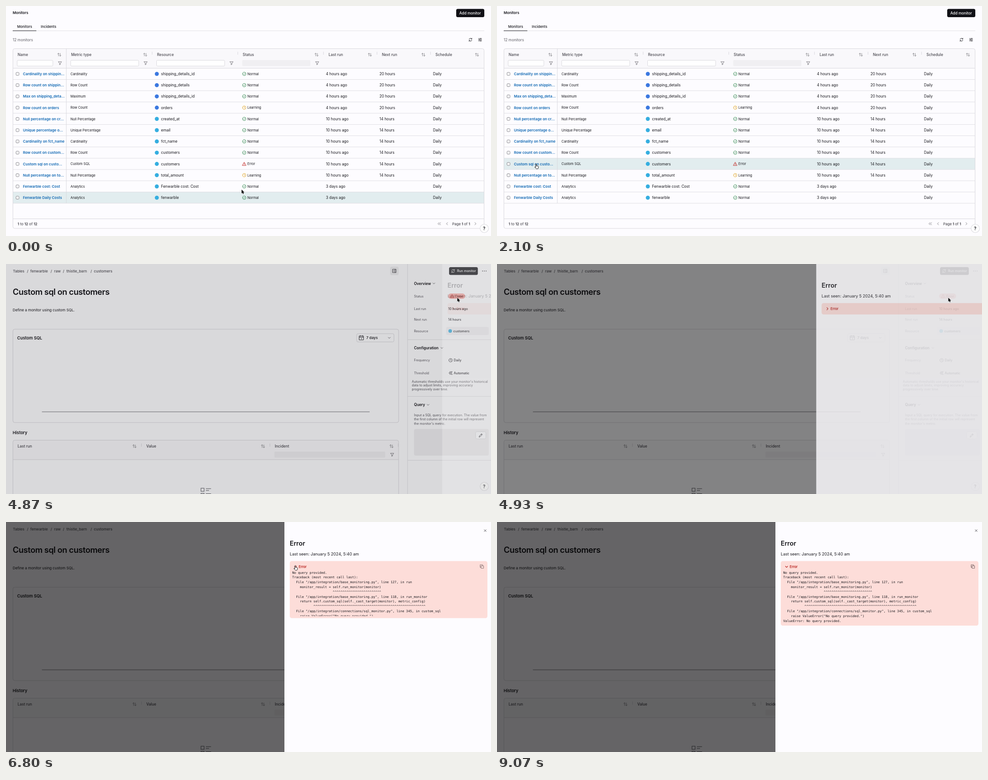
An HTML page for the animation above (9860 ms loop, 1087 by 515 pixels).

```html
<!DOCTYPE html>
<html lang="en">
<head>
<meta charset="utf-8">
<title>Monitors</title>
<style>
html, body { margin: 0; width: 100%; height: 100%; overflow: hidden; background: #fdfcff; }
svg { display: block; width: 100%; height: 100%; }
text { font-family: Inter, sans-serif; white-space: pre; }
.mono { font-family: "DejaVu Sans Mono", monospace; }
</style>
</head>
<body>
<svg id="stage" viewBox="0 0 1087 515" xmlns="http://www.w3.org/2000/svg"></svg>
<script>
const LOOP = 9860, DRAWER_W = 463;
const BG = '#fdfcff', INK = '#17171c', GREY = '#5d5c63', LINE = '#d9d8dd';
const LINK = '#1068b3', RED = '#b51c18', BLUE = '#3b78e0', CYAN = '#35aee0';

// Drawing helpers: text takes the vertical centre of its capitals.
const text = (x, y, s, size = 8.4, fill = INK, weight = 400) =>
  `<text x="${x}" y="${y + size * .364}" font-size="${size}" fill="${fill}" font-weight="${weight}">${s}</text>`;
const box = (x, y, w, h, fill = 'none', stroke = 'none', r = 0) =>
  `<rect x="${x}" y="${y}" width="${w}" height="${h}" rx="${r}" fill="${fill}" stroke="${stroke}"/>`;
const line = (x1, y1, x2, y2, stroke = LINE, w = 1) =>
  `<path d="M${x1} ${y1}L${x2} ${y2}" stroke="${stroke}" stroke-width="${w}"/>`;
const disc = (x, y, r, fill) => `<circle cx="${x}" cy="${y}" r="${r}" fill="${fill}"/>`;
const icon = (d, x, y, stroke = INK, w = .9) =>
  `<path d="${d}" transform="translate(${x} ${y})" fill="none" stroke="${stroke}" stroke-width="${w}" stroke-linecap="round" stroke-linejoin="round"/>`;
const each = (list, fn) => list.map(fn).join('');

const ring = 'M-3.8 0a3.8 3.8 0 1 0 7.6 0a3.8 3.8 0 1 0-7.6 0';
const D = {
  check: ring + 'M-1.7 .1L-.5 1.3 1.8-1.1',
  clock: ring + 'M0-2V.2L1.4 1',
  alert: 'M0-3.6L4.1 3.5H-4.1ZM0-1V1M0 2.2V2.3',
  sort: 'M-2 3V-3.3M-4-1.4L-2-3.4 0-1.4M2-3V3.3M0 1.4L2 3.4 4 1.4',
  funnel: 'M-3.6-3.2H3.6L1 .3V2.6L-1 3.6V.3Z',
  refresh: 'M-3.1-.8A3.2 3.2 0 0 1 2.7-1.8M3.1-3.5V-1.5H1.1M3.1 .8A3.2 3.2 0 0 1-2.7 1.8M-3.1 3.5V1.5H-1.1',
  sliders: 'M-3.5-2.6H3.5M-3.5 0H3.5M-3.5 2.6H3.5M1.4-3.4V-1.8M-1.4-.8V.8M1.4 1.8V3.4',
  down: 'M-2.4-1.2L0 1.2 2.4-1.2',
  left: 'M1.2-2.6L-1.4 0 1.2 2.6',
  right: 'M-1.2-2.6L1.4 0-1.2 2.6',
  panel: 'M-3.7-3.7H3.7V3.7H-3.7ZM1.3-3.7V3.7M-2-1.3L-.7 0-2 1.3',
  calendar: 'M-4.7-3.8H4.7V5H-4.7ZM-4.7-.9H4.7M-2.4-5V-2.8M2.4-5V-2.8M0 1.2V3',
  sparkle: 'M-1-3.2Q-.6-.3 2-.1Q-.6 .3-1 3.3Q-1.4 .3-3.8-.1Q-1.4-.3-1-3.2M2.4-3.6V-1.8M1.5-2.7H3.3M2.6 1.8V3.6M1.7 2.7H3.5',
  pencil: 'M-3.6 3.6L-3 1.2 2-3.6 3.6-2-1.3 3ZM1-2.6L2.6-1',
  copy: 'M-1.5-1.5H3.9V3.9H-1.5ZM-3.9 1.5V-3.9H1.7V-1.7M-3.9 1.5H-1.7',
  cross: 'M-2.3-2.3L2.3 2.3M2.3-2.3L-2.3 2.3'
};

const help = disc(1072, 498, 9.8, '#d2d1d6') + disc(1072, 498, 9, '#fff') + text(1069, 498, '?', 10, INK, 600);

const ROW_H = 25.2, ROW_TOP = 139.3;
const NORMAL = ['Normal', 'check', '#2c854a'], LEARN = ['Learning', 'clock', '#dfa320'], ERROR = ['Error', 'alert', '#c2241f'];
// name, metric, resource, status, last run, next run
const rows = [
  ['Cardinality on shippin...', 'Cardinality', 'shipping_details_id', NORMAL, '4 hours', '20 hours'],
  ['Row count on shippin...', 'Row Count', 'shipping_details', NORMAL, '4 hours', '20 hours'],
  ['Max on shipping_deta...', 'Maximum', 'shipping_details_id', NORMAL, '4 hours', '20 hours'],
  ['Row count on orders', 'Row Count', 'orders', LEARN, '4 hours', '20 hours'],
  ['Null percentage on cr...', 'Null Percentage', 'created_at', NORMAL, '10 hours', '14 hours'],
  ['Unique percentage o...', 'Unique Percentage', 'email', NORMAL, '10 hours', '14 hours'],
  ['Cardinality on fct_name', 'Cardinality', 'fct_name', NORMAL, '10 hours', '14 hours'],
  ['Row count on custom...', 'Row Count', 'customers', NORMAL, '10 hours', '14 hours'],
  ['Custom sql on custo...', 'Custom SQL', 'customers', ERROR, '10 hours', '14 hours'],
  ['Null percentage on to...', 'Null Percentage', 'total_amount', LEARN, '10 hours', '14 hours'],
  ['Fenwarble cost: Cost', 'Analytics', 'Fenwarble cost: Cost', NORMAL, '3 days', ''],
  ['Fenwarble Daily Costs', 'Analytics', 'fenwarble', NORMAL, '3 days', '']
];

function tableRow([name, metric, resource, [status, mark, color], last, next], i) {
  const y = 152 + i * ROW_H;
  return box(22.5, y - 3.3, 6.6, 6.6, '#fff', '#85848a', 1.6) +
    text(38, y, name, 8.15, LINK, 600) + text(144.5, y, metric, 7.45) +
    disc(338, y, 4.5, i < 4 ? BLUE : CYAN) + text(347.5, y, resource, 8.45) +
    icon(D[mark], 534, y, color) + text(541, y, status, 7.45) +
    text(717, y, last + ' ago') + text(837, y, next) + text(957, y, 'Daily') +
    line(16, ROW_TOP + (i + 1) * ROW_H, 1071, ROW_TOP + (i + 1) * ROW_H, '#dfdee3');
}

const label = ([x, s]) => text(x, 109, s, 8.35, '#48474e', 500);
const listPage = `
  ${text(15, 15.5, 'Monitors', 8.15, INK, 600)}
  ${box(1009, 6.5, 63, 18.5, '#111116', 'none', 3.5)}${text(1016, 15.7, 'Add monitor', 8.25, '#fff', 500)}
  ${text(25, 46.5, 'Monitors', 7.95, INK, 500)}${text(78, 46.5, 'Incidents', 7.95, INK, 500)}
  ${line(15, 55.5, 1072, 55.5, '#e2e1e6')}${line(15, 55.5, 68, 55.5, INK, 1.2)}
  ${text(15, 76, '12 monitors', 8.35, GREY)}
  ${icon(D.refresh, 1041, 75.5)}${icon(D.sliders, 1062.5, 75.5)}
  ${box(15.5, 95.5, 1056, 402.5, BG, 'none', 4)}${box(16, 96, 1055, 43, '#f9f8fb', 'none', 3)}
  <rect id="hover" x="16" width="1055" height="${ROW_H}" fill="#e2edef"/>
  ${each([[26, 'Name'], [146, 'Metric type'], [338.5, 'Resource'], [530.5, 'Status'], [723, 'Last run'], [842.5, 'Next run'], [962.5, 'Schedule']], label)}
  ${each([119.5, 312, 696, 815.5, 935.5, 1055.5], x => icon(D.sort, x, 109, '#77767c', .8))}
  ${each([327.5, 519.5, 711.5, 831.5, 951.5], x => line(x, 102.5, x, 109))}
  ${each([[25, 80], [145, 152.5], [337.5, 152.5]], ([x, w]) => box(x, 121.5, w, 13, '#fff', LINE, 2))}
  ${box(529.5, 121, 152.5, 13.5, '#f0eff2', 'none', 2)}
  ${each([121, 313, 505.5, 697.5], x => icon(D.funnel, x, 128, '#5d5c63', .8))}
  ${line(16, ROW_TOP, 1071, ROW_TOP)}
  ${rows.map(tableRow).join('')}
  ${line(135.2, 96, 135.2, 441.5)}${line(16, 476.5, 1071, 476.5)}
  ${box(15.5, 95.5, 1056, 402.5, 'none', LINE, 4)}
  ${text(26, 488, '<tspan font-weight="600">1</tspan> to <tspan font-weight="600">12</tspan> of <tspan font-weight="600">12</tspan>', 8, '#36353b')}
  ${each([969.5, 972.8, 988.5], x => icon(D.left, x, 487.5, GREY, .8))}
  ${text(1000, 488, 'Page <tspan font-weight="600">1</tspan> of <tspan font-weight="600">1</tspan>', 7.95, '#36353b')}
  ${icon(D.right, 1052, 487.5, GREY, .8)}${help}`;

const side = (x, y, s) => text(x, y, s, 7.2, INK, 500);
const note = (x, y, step, lines) => each(lines, (s, i) => text(x, y + i * step, s, 7.2, GREY));
const section = (y, s, arrow) => text(914.5, y, s, 8.25, INK, 600) + icon(D.down, arrow, y, GREY);

const detailPage = `
  ${each([[15.5, 'Tables'], [47, '/'], [54.5, 'fenwarble'], [100, '/'], [108, 'raw'], [127.5, '/'], [135.5, 'thistle_barn'], [189.5, '/'], [197, 'customers']],
    ([x, s]) => text(x, 15.8, s, 8.2, '#55545b', 500))}
  ${box(861, 6, 19, 19, '#efeef1', 'none', 3.5)}${icon(D.panel, 870.5, 15.5, '#3b3a40')}
  <g letter-spacing="-.4">${text(15, 62, 'Custom sql on customers', 18.4, INK, 600)}</g>
  ${text(15, 103.5, 'Define a monitor using custom SQL.', 8.2)}
  ${box(15.5, 146, 864.5, 209, 'none', LINE, 4)}
  ${text(25, 165.3, 'Custom SQL', 9.4, INK, 600)}
  ${box(786, 156, 83.5, 18.5, BG, LINE, 3)}${icon(D.calendar, 796.5, 165)}
  ${text(807.5, 165.3, '7 days', 8.2, INK, 500)}${icon(D.down, 859, 165.3, GREY)}
  ${line(80.5, 331, 815, 331, '#717076')}
  ${text(15, 377.3, 'History', 9.3, INK, 600)}
  ${box(16, 394.5, 864, 43.5, '#f9f8fb', 'none', 3)}
  <path d="M15.5 516V398.500a4 4 0 0 1 4-4H876a4 4 0 0 1 4 4V516M16 438H880" fill="none" stroke="${LINE}"/>
  ${each([[26, 'Last run'], [314.5, 'Value'], [602.5, 'Incident']], ([x, s]) => text(x, 408, s, 8.35, '#48474e', 500))}
  ${each([288, 576, 864], x => icon(D.sort, x, 408, '#77767c', .8))}
  ${each([303.5, 591.5, 879], x => line(x, 402, x, 409))}
  ${box(601.5, 420, 248.5, 13.5, '#f0eff2', 'none', 2)}${icon(D.funnel, 865.5, 427, GREY, .8)}
  ${each([502, 513.5], y => box(437, y, 7, 7, 'none', '#55545b') + line(448, y + 1, 459.5, y + 1, '#55545b') + line(448, y + 5, 455, y + 5, '#55545b'))}
  ${each([[900, 0, 900, 515], [900, 169.5, 1087, 169.5], [900, 296.5, 1087, 296.5], [900, 439.5, 1087, 439.5]], p => line(...p, '#e0dfe4'))}
  ${box(993, 7, 64.5, 17.5, '#111116', 'none', 3.5)}${icon(D.refresh, 1002, 15.7, '#fff')}${text(1011, 15.8, 'Run monitor', 7.3, '#fff', 500)}
  ${each([1068, 1072, 1076], x => disc(x, 15.7, .9, INK))}
  ${section(43.5, 'Overview', 959)}${section(188, 'Configuration', 977)}${section(315.3, 'Query', 946)}
  ${each([[72, 'Status'], [100, 'Last run'], [124, 'Next run'], [150, 'Resource'], [215.5, 'Frequency'], [244, 'Threshold']],
    ([y, s]) => text(914.5, y, s, 7.1, GREY))}
  ${box(991, 66, 38, 12, '#f6a6a1', 'none', 6)}${icon(D.alert, 1000, 71.8, RED, .8)}${text(1007, 72, 'Error', 7.3, '#7f1d1a', 500)}
  ${side(991, 100, '10 hours ago')}${side(991, 124, '14 hours')}
  ${box(986.5, 141, 95.5, 18, '#f2f1f4', 'none', 3)}${disc(995.5, 150, 4, CYAN)}${side(1002.5, 150.2, 'customers')}
  ${icon(D.clock, 996.5, 215.5)}${side(1003.5, 215.5, 'Daily')}${icon(D.sparkle, 996.5, 244.2)}${side(1003.5, 244.2, 'Automatic')}
  ${note(909.5, 263, 8.8, ["Automatic thresholds use your monitor's historical", 'data to adjust limits, improving accuracy', 'progressively over time.'])}
  ${note(914.5, 338, 9.6, ['Input a SQL query for execution. The value from', 'the first column of the initial row will represent', "the monitor's metric."])}
  ${box(914.5, 369.5, 167.5, 59.5, '#f0eff2', 'none', 4)}
  ${box(1052.5, 375.5, 23, 16, '#fdfcff', LINE, 3)}${icon(D.pencil, 1064, 383.7)}${help}`;

const trace = [
  'No query provided.',
  'Traceback (most recent call last):',
  '  File "/app/integration/base_monitoring.py", line 127, in run',
  '    monitor_result = self.run_monitor(monitor)',
  ' '.repeat(21) + '^'.repeat(25),
  '  File "/app/integration/base_monitoring.py", line 118, in run_monitor',
  '    return self.custom_sql(self._cast_target(monitor), metric_config)',
  ' '.repeat(11) + '^'.repeat(58),
  '  File "/app/integration/connections/sql_monitor.py", line 345, in custom_sql',
  '    raise ValueError("No query provided.")',
  'ValueError: No query provided.'
];

const drawer = `
  ${box(624, 0, DRAWER_W, 515, BG)}
  ${icon(D.cross, 1074, 19.3, '#45444a')}
  ${text(636, 47.5, 'Error', 14.4, INK, 600)}
  ${text(636, 71.3, 'Last seen: January 5 2024, 5:40 am', 9.15)}
  <rect id="alert" x="636" y="87.500" width="443" rx="4.500" fill="#fdddd9"/>
  <g id="chevron">${icon(D.right, 0, 0, RED, 1.1)}</g>
  ${text(656, 100.2, 'Error', 7.4, RED, 600)}
  <g id="copy">${icon(D.copy, 1066.5, 99.7, '#5a4a4c', .8)}</g>
  <clipPath id="fold"><rect id="foldBox" x="636" y="106" width="443"/></clipPath>
  <g clip-path="url(#fold)" font-size="7.2" fill="${INK}">
    ${each(trace, (s, i) => `<text class="mono" x="641.5" y="${115.5 + i * 10.8}">${s}</text>`)}
  </g>`;

const $ = id => document.getElementById(id);
$('stage').innerHTML = `
  ${box(0, 0, 1087, 515, BG)}
  <g id="list">${listPage}</g><g id="detail">${detailPage}</g>
  <rect id="shade" width="1087" height="515"/>
  <g id="drawer">${drawer}</g>
  <g id="cursor">
    <path id="arrow" d="M0 0V8.800L2 7 3.300 10 4.900 9.300 3.600 6.400H6.300Z" fill="#000" stroke="#fff" stroke-width="1" paint-order="stroke"/>
    <path id="hand" d="M-1 .8a.9 .9 0 0 1 1.800 0V4l2.900 .6q1.300 .3 1.200 1.600l-.4 2.600q-.2 1.800-2 1.800H.8q-1 0-1.700-1L-3.200 7q-.3-.9 .6-1L-1 7Z" fill="#fff" stroke="#000" stroke-width=".9"/>
  </g>`;

const clamp = v => Math.min(1, Math.max(0, v));
// The CSS "ease" curve, solved by bisection.
function ease(p) {
  let lo = 0, hi = 1, u;
  for (let i = 0; i < 24; i++) {
    u = (lo + hi) / 2;
    const x = .75 * u * (1 - u) + u ** 3;
    if (x < p) lo = u; else hi = u;
  }
  return .3 * u * (1 - u) ** 2 + 3 * u * u * (1 - u) + u ** 3;
}
const smooth = p => p * p * (3 - 2 * p), speedUp = p => p * p, slowDown = p => 1 - (1 - p) ** 3;

// Cursor stops: time, x, y, easing towards the stop
const path = [
  [0, 528, 411], [270, 528, 411], [1040, 547.5, 356], [1200, 547.5, 356], [2000, 88, 354],
  [3230, 88, 354], [3430, 458.5, 275, speedUp], [3880, 1014, 66, slowDown], [4400, 1011.5, 75.5],
  [5470, 1011.5, 75.5], [6300, 648.5, 97.5], [7670, 648.5, 97.5], [8050, 860, 208],
  [8400, 880, 117], [8670, 880, 117], [8830, 750, 4], [LOOP, 750, 4]
];
function cursorAt(t) {
  const i = Math.max(1, path.findIndex(k => k[0] >= t));
  const [t0, x0, y0] = path[i - 1], [t1, x1, y1, curve = smooth] = path[i];
  const p = curve((t - t0) / (t1 - t0));
  return [x0 + (x1 - x0) * p, y0 + (y1 - y0) * p];
}

const show = (id, on) => $(id).style.display = on ? '' : 'none';
const set = (id, name, value) => $(id).setAttribute(name, value);

function draw(t) {
  const onList = t < 2450;
  const slide = t < 4800 ? 0 : ease(clamp((t - 4839) / 184));
  const open = t < 6600 ? 0 : ease(clamp((t - 6688) / 200));
  const [x, y] = cursorAt(t);

  show('list', onList);
  show('detail', !onList);
  set('hover', 'y', ROW_TOP + ROW_H * (t < 50 ? 11 : Math.floor((y - ROW_TOP) / ROW_H)));

  set('shade', 'opacity', .6 * slide);
  set('drawer', 'opacity', slide);
  set('drawer', 'transform', `translate(${DRAWER_W * (1 - slide)} 0)`);

  const bottom = 113 + 119 * open;
  set('alert', 'height', bottom - 87.5);
  set('foldBox', 'height', open ? bottom - 4.5 - 106 : 0);
  set('chevron', 'transform', `translate(649 100.2) rotate(${90 * open})`);
  set('copy', 'opacity', open);

  const hand = onList ? x < 132 : slide === 0 ? false : y > 88 && y < 113 && t < 7800;
  set('cursor', 'transform', `translate(${x} ${y})`);
  show('cursor', t < 8840);
  show('hand', hand);
  show('arrow', !hand);
}

const start = performance.now();
function tick() {
  draw((performance.now() - start) % LOOP);
  requestAnimationFrame(tick);
}
tick();
</script>
</body>
</html>
```
